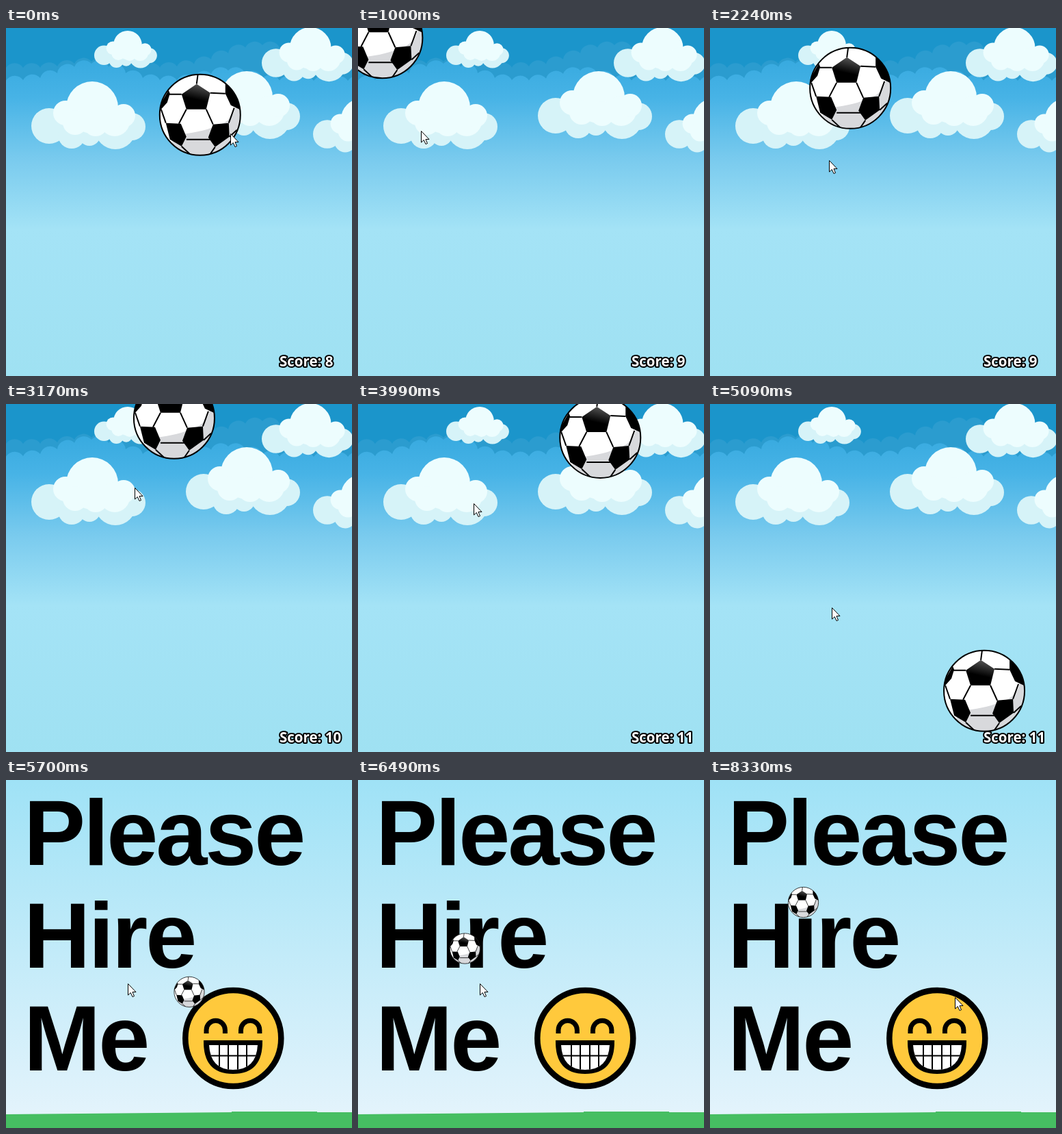
Animation of 506x508 px, one loop 8740 ms. Source, as an HTML page:

```html
<!DOCTYPE html>
<html>
<head>
<meta charset="utf-8">
<style>
  html, body { margin: 0; width: 100%; height: 100%; overflow: hidden; }
  svg { display: block; width: 506px; height: 508px; }
  #score { font: bold 20.5px "Noto Sans", sans-serif; fill: #fff; stroke: #000; stroke-width: 4; stroke-linejoin: round; paint-order: stroke; }
  #plea { font: bold 135px "Liberation Sans", Arial, sans-serif; letter-spacing: -.023em; }
</style>
</head>
<body>
<svg viewBox="0 0 506 508">
  <defs>
    <linearGradient id="sky" gradientUnits="userSpaceOnUse" x1="0" y1="0" x2="0" y2="508">
      <stop offset=".08" stop-color="#36a9df"/>
      <stop offset=".2" stop-color="#47b3e6"/>
      <stop offset=".38" stop-color="#7acbee"/>
      <stop offset=".58" stop-color="#a4e3f6"/>
      <stop offset="1" stop-color="#9fe1f2"/>
    </linearGradient>
    <linearGradient id="haze" x2="0" y2="1">
      <stop stop-color="#9fe2f6"/>
      <stop offset="1" stop-color="#e6f4fc"/>
    </linearGradient>
    <linearGradient id="shine" x1=".6" y1="0" x2=".45" y2=".6">
      <stop stop-color="#555"/>
      <stop offset="1"/>
    </linearGradient>
    <clipPath id="round"><circle r="59"/></clipPath>
    <clipPath id="grin"><path d="M297 387H368Q366 423 332 423Q299 423 297 387Z"/></clipPath>

    <g id="cloud">
      <g fill="#d6f3f8">
        <circle cx="26" cy="65" r="26"/><circle cx="59" cy="78" r="20"/>
        <circle cx="85" cy="78" r="16"/><circle cx="123" cy="69" r="30"/>
        <circle cx="147" cy="66" r="20"/>
      </g>
      <g fill="#edfdfe">
        <circle cx="89" cy="38" r="38"/><circle cx="50" cy="46" r="18"/>
        <circle cx="64" cy="60" r="18"/><circle cx="94" cy="62" r="18"/>
        <circle cx="122" cy="58" r="22"/><circle cx="135" cy="50" r="17"/>
      </g>
    </g>

    <g id="ball">
      <circle r="59" fill="#fff"/>
      <g clip-path="url(#round)">
        <path fill="#d8d9dc" d="M-36 29Q0 26 22 17Q48 10 52 -12L62 -14V62H-50Z"/>
        <path d="M-50 12L-28 13L-20 32L-27 46L-44 36ZM19 14L42 12L43 32L22 47L12 33ZM-62 -8L-46 -36L-44 -31L-48 -18L-57 -8ZM37 -48V-31L45 -14L62 -6V-50Z"/>
        <path fill="url(#shine)" d="M-5 -45L15 -32L9 -8L-20 -8L-27 -30Z"/>
        <path fill="none" stroke="#000" stroke-width="2" d="M-5 -45L-3 -60M-27 -30H-45M15 -32L37 -31M-20 -8L-31 13M9 -8L19 14M-50 12L-57 -8M42 12L50 -10M-20 36H17M-27 46L-12 60M22 47L13 60M43 32L54 22"/>
      </g>
      <circle r="59" fill="none" stroke="#000" stroke-width="2"/>
    </g>
  </defs>

  <g id="game">
    <rect width="506" height="508" fill="#1b95cb"/>
    <path id="far" fill="#2b9ccf"/>
    <path id="near" fill="url(#sky)"/>
    <use href="#cloud" x="37" y="78"/>
    <use href="#cloud" x="263" y="63"/>
    <use href="#cloud" transform="translate(449 103) scale(.8)"/>
    <use href="#cloud" transform="translate(374 -1) scale(.8)"/>
    <use href="#cloud" transform="translate(129 4) scale(.55)"/>
  </g>

  <g id="ending">
    <rect width="506" height="508" fill="url(#haze)"/>
    <path fill="#46be62" d="M0 488L330 485V484H455V485H506V508H0Z"/>
    <g id="plea">
      <text x="26" y="124">Please</text>
      <text x="26" y="274">Hire</text>
      <text x="26" y="424">Me</text>
    </g>
    <circle cx="332.3" cy="377" r="70" fill="#ffc93c" stroke="#000" stroke-width="8.500"/>
    <path fill="none" stroke="#000" stroke-width="7" d="M293 370V365a13.7 13.7 0 0 1 27.4 0V370M343.5 370V365a13.7 13.7 0 0 1 27.4 0V370"/>
    <path d="M289 380H375Q376 429 332 429Q288 429 289 380Z"/>
    <g clip-path="url(#grin)">
      <rect x="289" y="380" width="86" height="50" fill="#fff"/>
      <path stroke="#000" stroke-width="2" d="M290 402.5H375M312 380V430M325 380V430M339 380V430M352 380V430"/>
    </g>
  </g>

  <use id="player" href="#ball"/>
  <text id="score" x="400" y="494"></text>
  <path id="cursor" fill="#fff" stroke="#000" d="M.5 .5V17L4.3 13.5L7 19.5L9.5 18.5L7 12.5H12Z"/>
</svg>
<script>
const LOOP = 8740, ENDING = 5240, REBOUND = 5890, GRAVITY = .000665, GLIDE = 400;
const $ = id => document.getElementById(id);
const mix = (a, b, k) => a + (b - a) * k;
const place = (id, x, y, scale = 1) =>
  $(id).setAttribute('transform', `translate(${x} ${y}) scale(${scale})`);

// Where the ball is kicked or bounces; it flies in parabolas between
const hits = [
  { t: 0, x: 284, y: 127 },
  { t: 800, x: 95, y: 99, kick: 1 },
  { t: 925, x: 25, y: 43 },
  { t: 2415, x: 229, y: 180, kick: 1 },
  { t: 3620, x: 256, y: 106, kick: 1 },
  { t: 4341, x: 447, y: 79 },
  { t: ENDING - 1, x: 392, y: 530 },
  { t: ENDING, x: 368, y: -22 },
  { t: REBOUND, x: 227, y: 486 },
  { t: 6660, x: 136.5, y: 178.5 }
];

// Where the pointer arrives and when; bend makes it swing downwards on the way
const stops = [
  { t: 0, x: 328, y: 154 },
  { t: 780, x: 91, y: 149 },
  { t: 1330, x: 143, y: 192 },
  { t: 2400, x: 185, y: 194 },
  { t: 3170, x: 188, y: 122 },
  { t: 3990, x: 169, y: 145 },
  { t: 5090, x: 178, y: 297 },
  { t: 7250, x: 490, y: 335, bend: 105 },
  { t: 7860, x: 367, y: 315 },
  { t: 8330, x: 358, y: 317 }
];

// The key points on either side of a time; the last one holds
function around(points, t) {
  const i = points.findLastIndex(p => p.t <= t);
  return [points[i], points[i + 1] ?? points[i]];
}

function ballAt(t) {
  const [a, b] = around(hits, t);
  if (a === b) return [a.x, a.y];
  const k = (t - a.t) / (b.t - a.t);
  const lift = t < REBOUND ? GRAVITY / 2 * (t - a.t) * (b.t - t) : 0;
  return [mix(a.x, b.x, k), mix(a.y, b.y, k) - lift];
}

function pointerAt(t) {
  const [a, b] = around(stops, t);
  if (a === b) return [a.x, a.y];
  const start = Math.max(a.t, b.t - GLIDE);
  const k = Math.max(0, (t - start) / (b.t - start));
  const ease = k < .5 ? 4 * k ** 3 : 1 - 4 * (1 - k) ** 3;
  return [mix(a.x, b.x, ease), mix(a.y, b.y, ease) + (b.bend ?? 0) * Math.sin(Math.PI * ease)];
}

// Bank of cloud: a row of arcs along a level line that rises in humps
function bank(id, level, ...humps) {
  const step = 25;
  const edge = x => humps.reduce((y, [at, height, width]) => y - height * Math.exp(-(((x - at) / width) ** 2)), level);
  let path = `M0 ${edge(0)}`;
  for (let x = step; x < 506 + step; x += step) path += `A15 15 0 0 1 ${x} ${edge(x)}`;
  $(id).setAttribute('d', path + 'V508H0Z');
}
bank('far', 58, [375, 33, 75], [125, 9, 40]);
bank('near', 77, [125, 25, 55], [325, 15, 40]);

function draw(now) {
  const t = now % LOOP, ended = t >= ENDING;
  $('game').style.display = $('score').style.display = ended ? 'none' : '';
  $('ending').style.display = ended ? '' : 'none';
  $('score').textContent = 'Score: ' + (8 + hits.filter(h => h.kick && h.t <= t).length);
  place('player', ...ballAt(t), ended ? .375 : 1);
  place('cursor', ...pointerAt(t).map(Math.round));
  requestAnimationFrame(draw);
}
draw(0);
</script>
</body>
</html>
```
